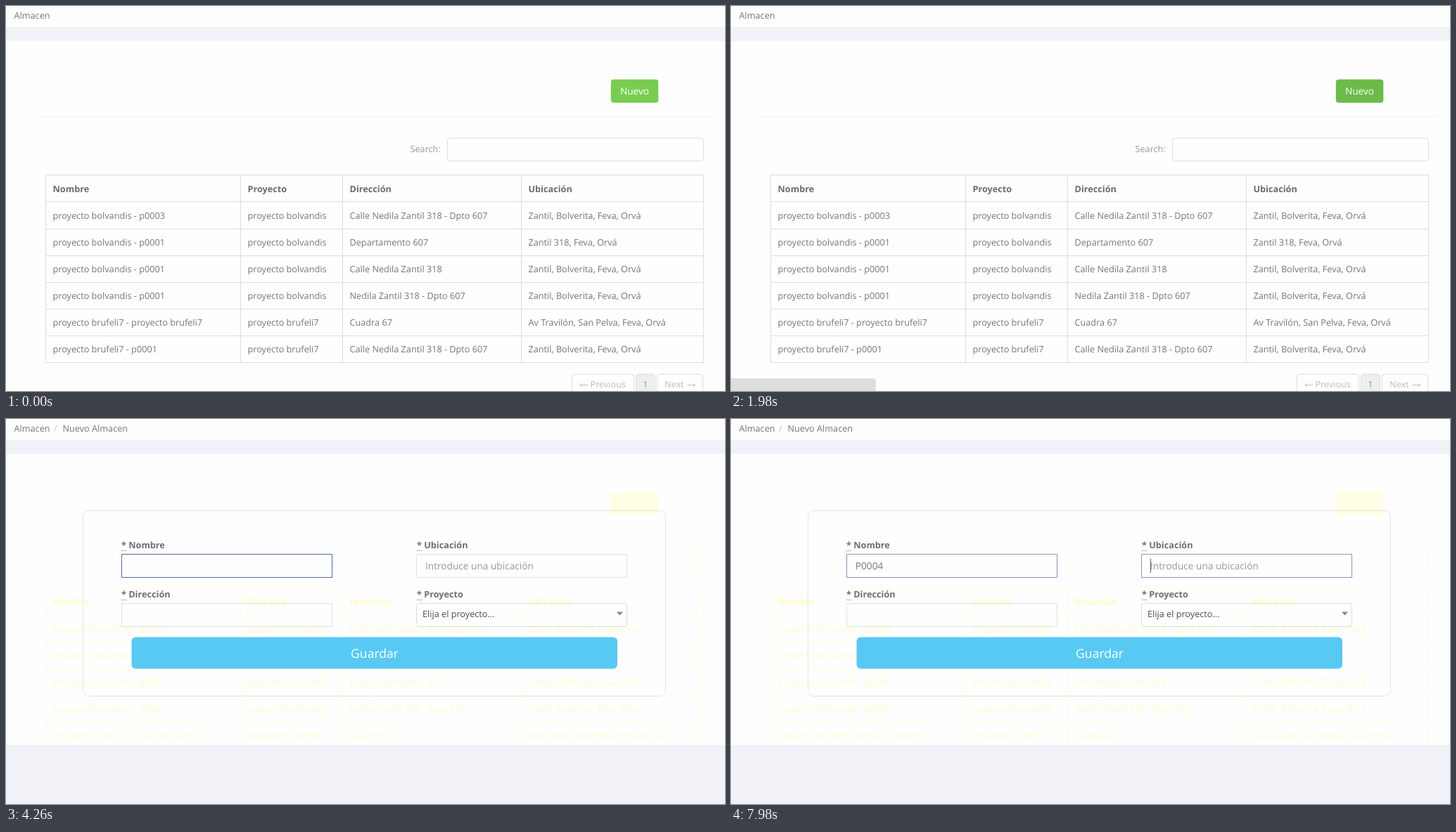
Animation, 1022 px wide and 548 px high, one loop 8000 ms. Source, as an HTML page with a canvas:

```html
<!DOCTYPE html>
<html lang="es">
<head>
<meta charset="utf-8">
<title>Almacen</title>
<style>
  html, body { margin: 0; width: 100%; height: 100%; overflow: hidden; background: #fefefe; }
  canvas { display: block; }
</style>
</head>
<body>
<canvas id="stage" width="1022" height="548"></canvas>
<script>
const LOOP = 8000;
const ctx = document.getElementById('stage').getContext('2d');
ctx.textRendering = 'geometricPrecision';

const SMALL = 12.69, MEDIUM = 13.67, LARGE = 17.57;
const PAGE = '#fefefe', BAND = '#f1f2f7', INK = '#767676', FIELD = [224, 225, 228], FOCUS = [76, 110, 154];

const BASE = { text: INK, head: '#6c6c6c', label: '#999', line: '#ddd', rule: '#f0f0f0' };
const GHOST = { text: '#fffacb', head: '#fffac6', label: '#fffacf', line: '#fffde4', rule: '#fbfbf8' };

const COLS = [56, 333, 478, 732, 991];
const A = 'proyecto bolvandis', B = 'proyecto brufeli7';
const STREET = 'Nedila Zantil 318', AREA = 'Zantil, Bolverita, Feva, Orvá';
const ROWS = [
  ['Nombre', 'Proyecto', 'Dirección', 'Ubicación'],
  [A + ' - p0003', A, `Calle ${STREET} - Dpto 607`, AREA],
  [A + ' - p0001', A, 'Departamento 607', 'Zantil 318, Feva, Orvá'],
  [A + ' - p0001', A, `Calle ${STREET}`, AREA],
  [A + ' - p0001', A, `${STREET} - Dpto 607`, AREA],
  [`${B} - ${B}`, B, 'Cuadra 67', 'Av Travilón, San Pelva, Feva, Orvá'],
  [B + ' - p0001', B, `Calle ${STREET} - Dpto 607`, AREA]
];

const KEYS = [5160, 5520, 5760, 6000, 6240];
const CARET_FLIPS = [2460, 2760, 3240, 4260, 4740, 6780, 7260, 7800];

// Value of the latest [time, value] step that has been reached.
const step = (t, steps) => steps.reduce((v, [at, next]) => t >= at ? next : v, 0);
const mix = (a, b, k) => `rgb(${a.map((v, i) => Math.round(v + (b[i] - v) * k))})`;

function rect(x, y, w, h, color) {
  ctx.fillStyle = color;
  ctx.fillRect(x, y, w, h);
}

function text(str, x, y, { size = SMALL, color = INK, bold = false, align = 'left' } = {}) {
  ctx.font = `${bold ? 'bold ' : ''}${size}px "Open Sans", "Noto Sans", sans-serif`;
  ctx.textAlign = align;
  ctx.fillStyle = color;
  ctx.fillText(str, x, y);
}

function box(x, y, w, h, r, fill, line) {
  ctx.beginPath();
  ctx.roundRect(x, y, w, h, r);
  if (fill) { ctx.fillStyle = fill; ctx.fill(); }
  if (line) { ctx.strokeStyle = line; ctx.lineWidth = 1; ctx.stroke(); }
}

function arrow(x, y, dir, color) {
  ctx.strokeStyle = color;
  ctx.lineWidth = 1;
  ctx.beginPath();
  ctx.moveTo(x, y);
  ctx.lineTo(x + 11 * dir, y);
  ctx.moveTo(x + 8 * dir, y - 3);
  ctx.lineTo(x + 11 * dir, y);
  ctx.lineTo(x + 8 * dir, y + 3);
  ctx.stroke();
}

function header() {
  rect(0, 0, 1022, 548, PAGE);
  rect(0, 30, 1022, 20, BAND);
  text('Almacen', 11.5, 18);
}

function list(p) {
  rect(41, 157, 964, 1, p.rule);
  text('Search:', 574.5, 208, { color: p.label });
  box(627.5, 188, 364, 32.5, 4, null, p.line);
  for (let i = 0; i <= ROWS.length; i++) rect(56, Math.round(240.3 + 38.1 * i), 936, 1, p.line);
  for (const x of COLS) rect(x, 240, 1, 268, p.line);
  ROWS.forEach((row, i) => row.forEach((cell, c) =>
    text(cell, COLS[c] + 10.5, Math.round(264.7 + 38.1 * i), { bold: !i, color: i ? p.text : p.head })));
}

function pager() {
  const dim = '#bdbdbd';
  box(804.5, 524, 88, 34, 4, null, '#ddd');
  box(895.5, 524, 27, 34, 4, '#eee', '#ddd');
  box(925.5, 524, 65, 34, 4, null, '#ddd');
  arrow(827, 539.5, -1, dim);
  text('Previous', 830.5, 543, { color: dim });
  text('1', 909, 543, { color: '#7596ab', align: 'center' });
  text('Next', 936, 543, { color: dim });
  arrow(968.5, 539.5, 1, dim);
}

function statusBar(alpha, line) {
  ctx.globalAlpha = alpha;
  box(-2.5, 530.5, 208, 30, 3, '#dedede', line);
  ctx.globalAlpha = 1;
}

function listView(t) {
  header();
  list(BASE);
  const green = step(t, [[0, '#78cd51'], [1380, '#6cbb49'], [1920, '#64ad43'], [1980, '#6cbb49']]);
  box(859.8, 104.5, 67.5, 33.3, 4, green);
  text('Nuevo', 893.5, 126, { size: MEDIUM, color: '#fff', align: 'center' });
  pager();
  statusBar(step(t, [[1680, .5], [1740, 1]]), '#dedede');
}

function label(str, x, y) {
  text('* ' + str, x, y, { bold: true, color: '#6f6f70' });
  for (let i = 0; i < 7; i += 2) rect(x + i, y + 3, 1, 1, '#777');
}

function field(x, y, focus = 0, fill = null) {
  box(x, y, 299, 33, 0, fill, mix(FIELD, FOCUS, focus));
}

const caret = x => rect(x, 199, 1, 20, '#555');

function caretOn(t) {
  if (t >= KEYS[0] && t < 6780) return true;
  return CARET_FLIPS.filter(at => t >= at).length % 2 === 1;
}

function formView(t) {
  header();
  text('/', 68, 18, { color: '#c4c4c4' });
  text('Nuevo Almacen', 80.5, 18);

  list(GHOST);
  rect(860, 104, 67, 33, '#fffde4');
  rect(0, 464, 1022, 84, BAND);

  box(109.5, 130.5, 828, 264, 8, null, '#e4e4e7');
  label('Nombre', 164, 184);
  label('Ubicación', 584, 184);
  label('Dirección', 164, 254);
  label('Proyecto', 584, 254);

  const ready = t >= 2340;
  const leaving = step(t, [[7920, .25], [7980, .6]]);
  field(164.5, 192.5, step(t, [[2340, .3], [2400, .7], [2460, 1]]) * (1 - leaving * .6));
  field(583.5, 192.5, leaving, ready ? PAGE : null);
  field(164.5, 262.5);
  box(583.5, 262.5, 299, 33, 3, null, '#dcdce0');

  const typed = KEYS.filter(at => t >= at).length;
  text('P0004'.slice(0, typed), 176.8, 214, { size: MEDIUM });
  if (ready) text('Introduce una ubicación', 596, 214, { size: MEDIUM, color: '#979797' });
  if (t >= 7920) caret(596);
  else if (caretOn(t)) caret(typed ? 176 + 8 * typed : 177);

  text('Elija el proyecto...', 592, 282, { color: '#4c4c4c' });
  ctx.fillStyle = '#888';
  ctx.beginPath();
  ctx.moveTo(868, 274.5);
  ctx.lineTo(877, 274.5);
  ctx.lineTo(872.5, 279.5);
  ctx.fill();

  box(178.5, 310.5, 690.5, 45, 6, '#58c9f3');
  text('Guardar', 524, 340, { size: LARGE, color: '#fff', align: 'center' });
  statusBar(step(t, [[2280, 1], [2400, .5], [2460, 0]]), '#c9c9c9');
}

const start = performance.now();

function draw() {
  const t = (performance.now() - start) % LOOP;
  if (t < 2280) listView(t);
  else formView(t);
  requestAnimationFrame(draw);
}
draw();
</script>
</body>
</html>
```
